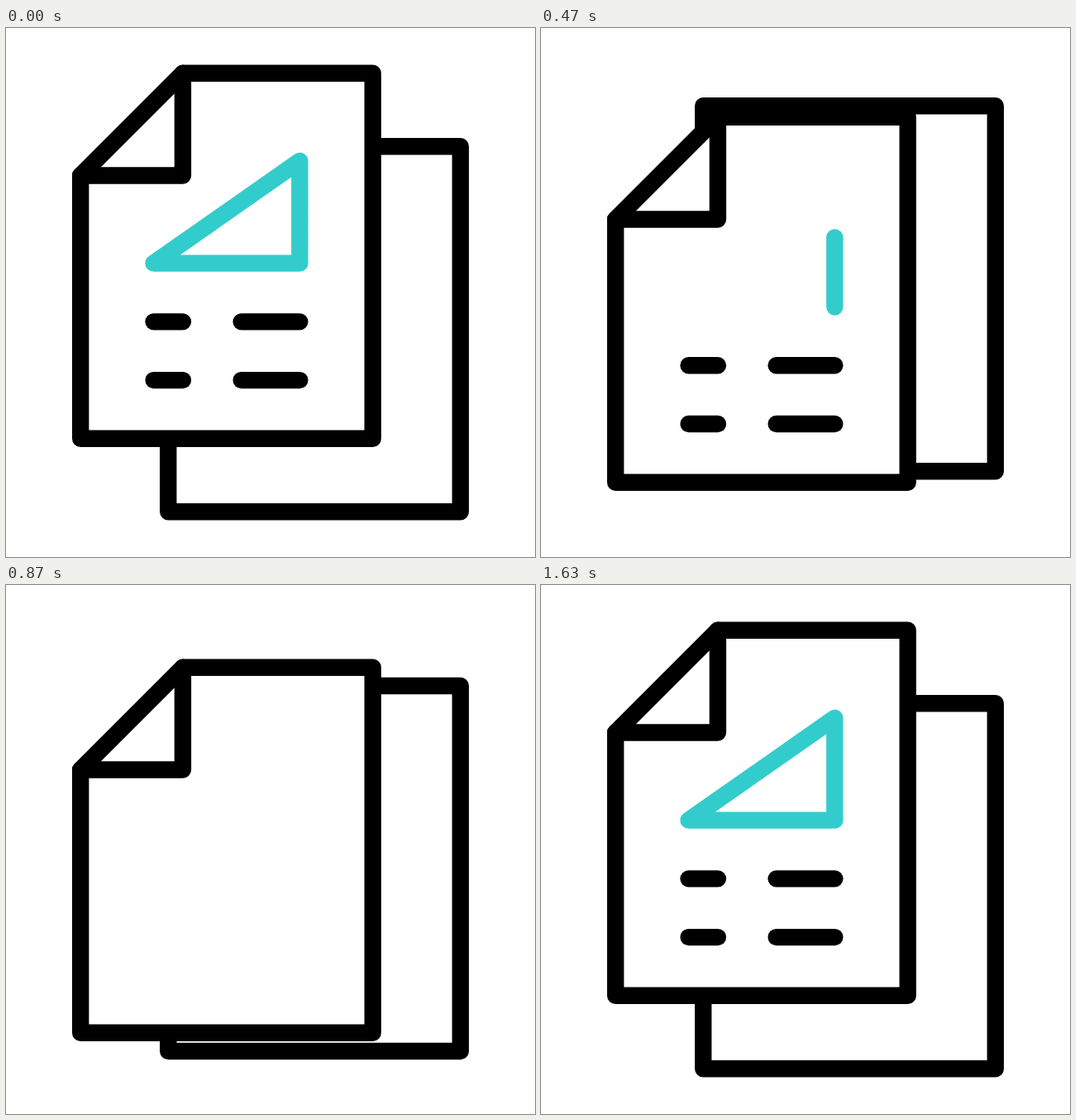
An HTML page that plays this animation: 640x640 px, repeating every 1670 ms.

```html
<!DOCTYPE html>
<html lang="en">
<head>
<meta charset="utf-8">
<title>Documents</title>
<style>
  html, body { margin: 0; width: 100%; height: 100%; overflow: hidden; background: #fff; }
  svg { display: block; width: 100%; height: 100%; }
</style>
</head>
<body>
<svg viewBox="0 0 640 640">
  <!-- one unit of the drawing grid is 17.68 px -->
  <g transform="translate(320 320) scale(17.68)" fill="none" stroke="#000"
     stroke-width="1.154" stroke-linecap="round" stroke-linejoin="round">
    <path id="back" d="M-7 -10H13V15H-7Z"/>
    <g id="front">
      <path fill="#fff" d="M-13 -8L-6 -15H7V10H-13Z"/>
      <path d="M-6 -15V-8H-13"/>
      <path class="ink" stroke="#33cccc" d="M2 -2H-8L2 -9V-2"/>
      <path class="ink" d="M-6 2H-8"/>
      <path class="ink" d="M2 2H-2"/>
      <path class="ink" d="M-6 6H-8"/>
      <path class="ink" d="M2 6H-2"/>
    </g>
  </g>
</svg>
<script>
const LOOP = 1670, STEP = 100 / 3, UNIT = 17.68;
const back = document.getElementById('back');
const front = document.getElementById('front');
const inks = [...document.querySelectorAll('.ink')].map(el => ({ el, len: el.getTotalLength() }));
const inkTotal = inks.reduce((sum, ink) => sum + ink.len, 0);

// Tracks are [step, value] keys, eased between neighbours.
const frontY = [[0, 0], [11, 85.7], [19, -20.2], [26, 45], [34, 0]];
const backY = [[0, 0], [11, -72.7], [20, 22], [26, -21.2], [34, 0]];
const erased = [[0, 0], [25, 1], [26.7, 1], [50, 0]];

// cubic-bezier(.36, 0, .64, 1)
function ease(x) {
  let lo = 0, hi = 1;
  for (let i = 0; i < 24; i++) {
    const u = (lo + hi) / 2, v = 1 - u;
    if (3 * v * v * u * 0.36 + 3 * v * u * u * 0.64 + u * u * u < x) lo = u;
    else hi = u;
  }
  return lo * lo * (3 - 2 * lo);
}

function valueAt(track, s) {
  const k = track.findIndex(key => key[0] > s);
  if (k < 0) return track[track.length - 1][1];
  const [s0, v0] = track[k - 1], [s1, v1] = track[k];
  return v0 + (v1 - v0) * ease((s - s0) / (s1 - s0));
}

function moveY(el, px) {
  el.setAttribute('transform', `translate(0 ${px / UNIT})`);
}

// Wipes the strokes one after another, each from its start.
function wipe(amount) {
  let left = amount * inkTotal;
  for (const { el, len } of inks) {
    const cut = Math.min(len, Math.max(0, left));
    left -= len;
    el.style.display = len - cut < 0.001 ? 'none' : '';
    el.setAttribute('stroke-dasharray', cut > 0 ? '99 99' : 'none');
    el.setAttribute('stroke-dashoffset', -cut);
  }
}

function draw(ms) {
  // The motion advances at 30 steps a second.
  const s = Math.min(49, Math.floor((ms % LOOP + 5) / STEP));
  moveY(front, valueAt(frontY, s));
  moveY(back, valueAt(backY, s));
  wipe(valueAt(erased, s));
}

const start = performance.now();
function tick() {
  draw(performance.now() - start);
  requestAnimationFrame(tick);
}
tick();
</script>
</body>
</html>
```
